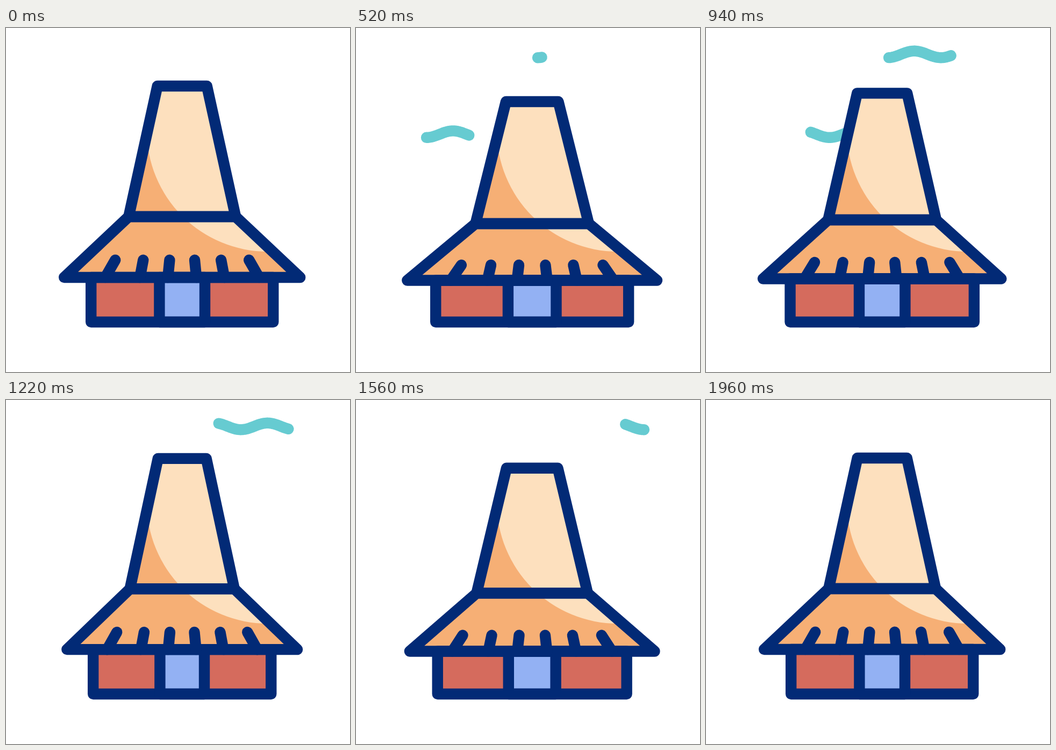
Animation, 640 px wide and 640 px high, one loop 2 s. Source, as an HTML page with a canvas:

```html
<!DOCTYPE html>
<html>
<head>
<meta charset="utf-8">
<style>
html, body { margin: 0; height: 100%; overflow: hidden; background: #fff; }
canvas { display: block; }
</style>
</head>
<body>
<canvas id="stage" width="640" height="640"></canvas>
<script>
const g = document.getElementById('stage').getContext('2d');
const NAVY = '#022a76', TEAL = '#66cbd1', CREAM = '#fde0be',
      ORANGE = '#f6af75', RED = '#d56b5d', BLUE = '#93b1f3';
const LOOP = 2000, CX = 327.7, GROUND = 547;

// [time, widening, stretching] relative to the resting house
const poses = [
  [100, 0, 0], [680, .072, -.081], [790, -.091, .051], [1030, .055, -.067],
  [1270, -.033, .006], [1500, .04, -.045], [1960, 0, 0]
];

const clamp = v => Math.min(1, Math.max(0, v));
const smooth = v => v * v * (3 - 2 * v);
const swing = (t, from, to) => (1 - Math.cos(Math.PI * clamp((t - from) / (to - from)))) / 2;

function poseAt(t) {
  const i = poses.findIndex(p => p[0] > t);
  if (i < 1) return [1, 1];
  const [t0, x0, y0] = poses[i - 1], [t1, x1, y1] = poses[i];
  const k = smooth((t - t0) / (t1 - t0));
  return [1 + x0 + (x1 - x0) * k, 1 + y0 + (y1 - y0) * k];
}

function trace(points, closed) {
  g.beginPath();
  points.forEach(p => g.lineTo(...p));
  if (closed) g.closePath();
}

function line(points, closed) {
  trace(points, closed);
  g.stroke();
}

function wind(t, x, y) {
  const head = swing(t, 400, 1365), tail = swing(t, 880, 1820);
  if (head <= 0 || tail >= 1) return;
  const points = [];
  for (let i = 0; i <= 60; i++) {
    const u = tail + (head - tail) * i / 60;
    points.push([x + 198 * u, y - 6.2 * (1 - Math.cos(4 * Math.PI * u))]);
  }
  g.strokeStyle = TEAL;
  line(points);
}

function house(t) {
  const [sx, sy] = poseAt(t);
  const X = d => CX + d * sx, Y = h => GROUND - h * sy;
  const top = Y(439), neck = Y(196), eave = Y(83);
  const band = (y0, d0, y1, d1) => [[X(-d0), y0], [X(d0), y0], [X(d1), y1], [X(-d1), y1]];
  const tower = band(top, 46, neck, 99.5);
  const roof = band(neck, 99.5, eave, 219.5);
  const walls = band(eave, 169.5, GROUND, 169.5);
  const door = band(eave, 42.3, GROUND, 42.3);

  for (const [shape, color] of [[walls, RED], [door, BLUE]]) {
    trace(shape, true);
    g.fillStyle = color;
    g.fill();
  }
  for (const shape of [tower, roof]) {
    g.save();
    trace(shape, true);
    g.clip();
    g.fillStyle = ORANGE;
    g.fillRect(0, 0, 640, 640);
    g.fillStyle = CREAM;
    g.beginPath();
    g.arc(487, 191, 225, 0, 7);
    g.fill();
    g.restore();
  }

  g.strokeStyle = NAVY;
  [tower, roof, walls, door].forEach(shape => line(shape, true));

  // thatch fringe
  const tip = 431.7 + (top - 108) * .32;
  for (const [a, b] of [[23.3, 26.5], [72.4, 78.5], [124.4, 143]])
    for (const side of [-1, 1])
      line([[X(side * a), tip], [X(side * b), eave]]);
}

function draw(now) {
  const t = now % LOOP;
  g.fillStyle = '#fff';
  g.fillRect(0, 0, 640, 640);
  g.lineWidth = 20.4;
  g.lineCap = g.lineJoin = 'round';
  wind(t, 338, 55.2);
  wind(t + 300, 131, 203.8);
  house(t);
}

const start = performance.now();
function tick() {
  draw(performance.now() - start);
  requestAnimationFrame(tick);
}
tick();
</script>
</body>
</html>
```
